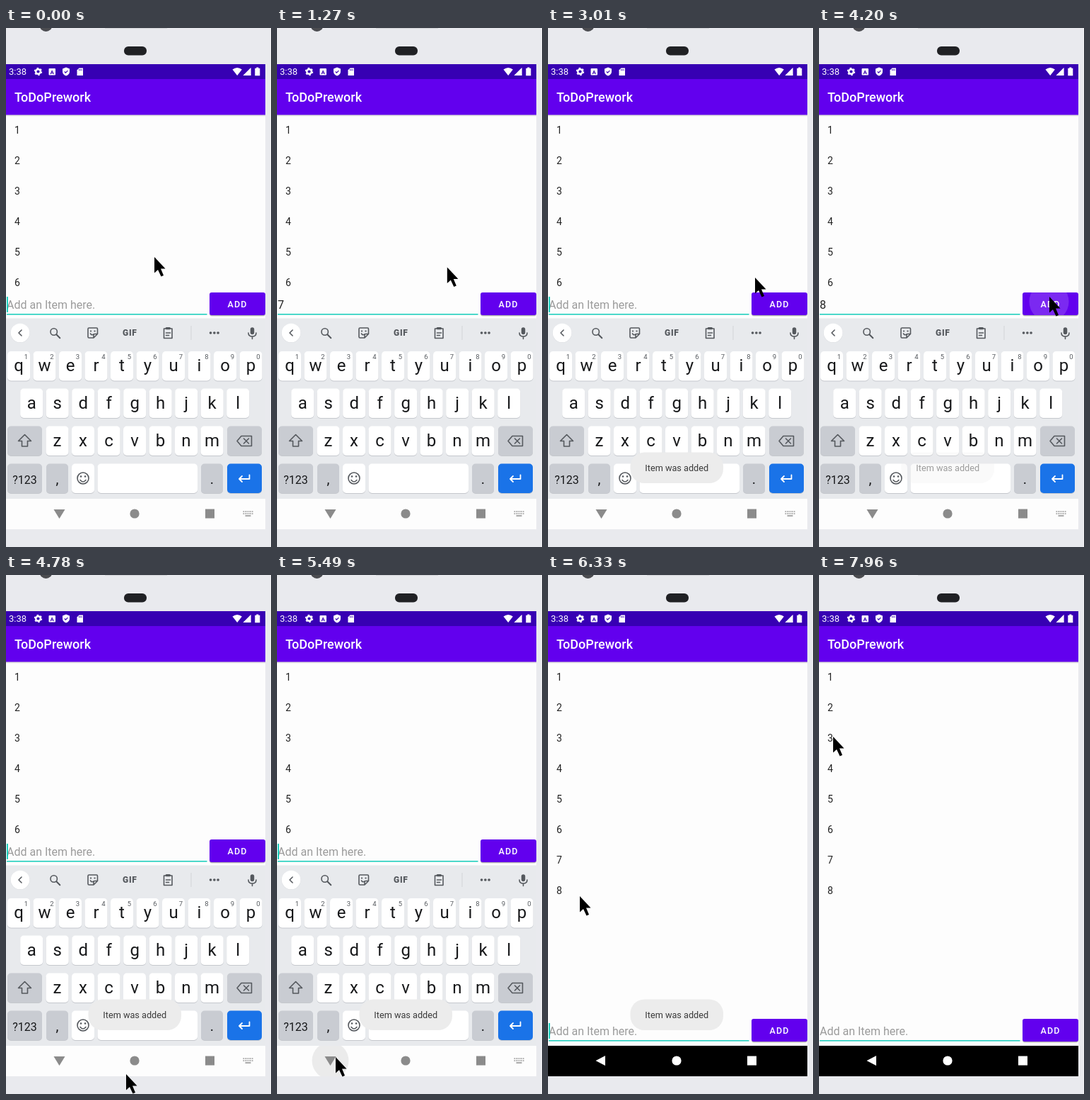
These frames come from a looping animation (375 by 732 pixels, 8000 ms). An HTML page:

```html
<!DOCTYPE html>
<html lang="en">
<head>
<meta charset="utf-8">
<title>To-do list</title>
<style>
html, body { margin: 0; width: 100%; height: 100%; overflow: hidden; background: #e9eaee; }
svg { display: block; width: 375px; height: 732px; font-family: Roboto, sans-serif; }
.line { fill: none; stroke: #55595e; stroke-width: 1.6; stroke-linecap: round; stroke-linejoin: round; }
.mid { text-anchor: middle; }
</style>
</head>
<body>
<svg viewBox="0 0 375 732">
  <defs>
    <clipPath id="listClip"><rect id="listBox" y="122" width="367" height="248"/></clipPath>
    <clipPath id="btnClip"><rect x="288" y="373" width="79" height="32" rx="3"/></clipPath>
    <clipPath id="kbClip"><rect y="406" width="367" height="258"/></clipPath>
    <clipPath id="navClip"><rect y="664" width="367" height="43"/></clipPath>
    <linearGradient id="shade" x2="0" y2="1">
      <stop stop-color="#000" stop-opacity=".22"/><stop offset="1" stop-color="#000" stop-opacity="0"/>
    </linearGradient>
  </defs>

  <!-- device -->
  <rect width="375" height="732" fill="#e9eaee"/>
  <rect x="374" width="1" height="732" fill="#f4f4f6"/>
  <circle cx="56.500" cy="-4" r="9" fill="#4b4c50"/>
  <rect x="140" width="88" height="1" fill="#d3d4d8"/>
  <rect x="167" y="26" width="32" height="12.500" rx="6" fill="#202124"/>
  <rect y="51" width="367" height="656" fill="#fdfdfd"/>

  <g id="list" clip-path="url(#listClip)" font-size="14" fill="#222"></g>

  <!-- bars -->
  <rect y="122" width="367" height="3" fill="url(#shade)"/>
  <rect y="51" width="367" height="21" fill="#3700b3"/>
  <rect y="72" width="367" height="50.500" fill="#6200ee"/>
  <text x="12" y="104" font-size="18" font-weight="500" fill="#fff">ToDoPrework</text>
  <g fill="#fff">
    <text x="4" y="66" font-size="13">3:38</text>
    <circle cx="45.500" cy="61.500" r="3.300" fill="none" stroke="#fff" stroke-width="2.400"/>
    <circle cx="45.500" cy="61.500" r="4.900" fill="none" stroke="#fff" stroke-width="1.600" stroke-dasharray="2.560"/>
    <rect x="60.500" y="57" width="9.500" height="9.500" rx="1"/>
    <text class="mid" x="65.250" y="64.700" font-size="8" font-weight="700" fill="#3700b3">A</text>
    <path d="M85 55.500l5 2v4q0 4-5 6-5-2-5-6v-4z"/>
    <path d="M82.800 61.500l1.600 1.600 2.900-3" fill="none" stroke="#3700b3" stroke-width="1.200"/>
    <path d="M103.500 56.500h5.500v10.500h-8.500v-7.500z"/>
    <path d="M103.500 58v2.200M105.300 58v2.200M107.100 58v2.200" stroke="#3700b3" stroke-width=".8"/>
    <path d="M320.500 58.500q6.700-5 13.400 0l-6.700 8.500z"/>
    <path d="M346.500 56v11h-11z" opacity=".5"/>
    <path d="M346.500 56v11h-11l7-7z"/>
    <path d="M354.300 55.500h3v1.300h2v10.500h-7v-10.500h2z"/>
  </g>

  <!-- entry row -->
  <g id="entry">
    <text id="field" x="1" y="396" font-size="16"></text>
    <rect x="1" y="403" width="283.500" height="1.600" fill="#22cfbf"/>
    <rect id="caret" y="379" width="1.800" height="22" fill="#03cbb8"/>
    <rect x="288" y="374" width="79" height="33" rx="4" opacity=".1"/>
    <rect x="288" y="374" width="79" height="32" rx="3" opacity=".22"/>
    <rect x="288" y="373" width="79" height="32" rx="3" fill="#6200ee"/>
    <g clip-path="url(#btnClip)"><circle id="ripple" cy="386" fill="#fff"/></g>
    <text x="313.500" y="394" font-size="12.500" font-weight="500" letter-spacing="1.100" fill="#fff">ADD</text>
  </g>

  <g clip-path="url(#kbClip)"><g id="keyboard">
    <rect y="410" width="367" height="254" fill="#e8eaed"/>
    <rect y="409" width="367" height="1" fill="#f2f3f5"/>
    <circle cx="20" cy="430.500" r="13.500" fill="#d9dbdf"/>
    <circle cx="20" cy="430" r="13.300" fill="#fff"/>
    <g class="line">
      <path d="M22 426l-4 4 4 4"/>
      <circle cx="67.700" cy="428.500" r="4.700"/><path d="M71.300 432.200l5 5" stroke-width="2"/>
      <path d="M117.500 423h10.500q1.500 0 1.500 1.500v7l-5.500 5.500h-6.500q-1.500 0-1.500-1.500v-11q0-1.500 1.500-1.500zM124 437v-4q0-1.500 1.500-1.500h4M119.500 431q2 3 4 1"/>
      <path d="M120 427.500h.1M125.500 427.500h.1" stroke-width="2.200"/>
      <path d="M223.500 424h11.500v13.500h-11.500zM226.500 430h6M226.500 433.500h4M227 424.500h4.500"/>
      <path d="M227 423.500h4.500" stroke-width="3"/>
      <path d="M289.500 430h.1M294.800 430h.1M300 430h.1" stroke-width="3.600"/>
      <path d="M348.500 425v4.500" stroke-width="5.500"/>
      <path d="M343 430q0 5 5.500 5t5.500-5M348.500 435v3.500"/>
    </g>
    <text x="165" y="434.300" font-size="12" font-weight="900" letter-spacing=".7" fill="#55595e">GIF</text>
    <rect x="261.500" y="420" width="1" height="20" fill="#d2d4d8"/>
    <g id="keys"></g>
    <g class="line" stroke-width="1.700">
      <path d="M26.500 573.500l9 9h-5v7.500h-8v-7.500h-5z"/>
      <path d="M333 575.500h14.500v14h-14.500l-6-7zM336.500 579l7 7M343.500 579l-7 7"/>
      <circle cx="109" cy="635" r="8"/>
      <path d="M105 637.500q4 5 8 0"/>
      <path d="M106 632.500h.1M112 632.500h.1" stroke-width="2.600"/>
      <path d="M344.500 630.500v5.500h-14M334 632l-4 4 4 4" style="stroke:#fff;stroke-width:1.800"/>
    </g>
  </g></g>

  <!-- navigation -->
  <rect id="navBack" y="664" width="367" height="43"/>
  <circle id="navRipple" cx="75.500" cy="685" r="26" clip-path="url(#navClip)"/>
  <g id="navIcons">
    <path id="back" d="M67.500 679h16l-8 13z"/>
    <circle cx="182" cy="685" r="6.600"/>
    <rect x="282" y="678.500" width="13" height="13"/>
  </g>
  <path id="imeIcon" d="M335.500 682h14M335.500 685h14" stroke="#8f8f8f" stroke-width="1.500" stroke-dasharray="1.500 1"/>
  <path id="imeBar" d="M338.500 688h8" stroke="#8f8f8f" stroke-width="1.500"/>

  <g id="toast">
    <rect id="toastBack" x="116.500" y="598.500" width="131.500" height="43.500" rx="20" fill="#ececec"/>
    <text x="137.300" y="625" font-size="12.700" fill="#3a3a3a">Item was added</text>
  </g>
  <path id="pointer" d="M0 0V22.500L5 18 9.500 27.500 13 26 9 16.500H15.500Z"/>
</svg>
<script>
const LOOP = 8000;
const $ = id => document.getElementById(id);
const set = (id, attrs) => { for (const k in attrs) $(id).setAttribute(k, attrs[k]); };
const clamp = v => Math.max(0, Math.min(1, v));

// Static keys and rows
const GREY = '#c9ccd2';
function key(x, y, w, label = '', fill = '#fff', size = 24) {
  const box = (dy, color) => `<rect x="${x}" y="${y + dy}" width="${w}" height="41.500" rx="5" fill="${color}"/>`;
  return box(1, '#c5c8cd') + box(0, fill) +
    `<text class="mid" x="${x + w / 2}" y="${y + 28}" font-size="${size}" fill="#17181a">${label}</text>`;
}
function row(letters, x, y) {
  return [...letters].map((c, i) => key(x + 36.5 * i, y, 32, c)).join('');
}
let keys = row('qwertyuiop', 2, 456) + row('asdfghjkl', 20.2, 508.5) + row('zxcvbnm', 56.5, 561.5);
for (let i = 0; i < 10; i++)
  keys += `<text class="mid" x="${28.5 + 36.5 * i}" y="466.500" font-size="9.500" fill="#55595e">${(i + 1) % 10}</text>`;
keys += key(2, 561.5, 49, '', GREY) + key(313, 561.5, 49, '', GREY) +
  key(2, 614.5, 49, '?123', GREY, 16) + key(57, 614.5, 31, ',', GREY, 20) + key(93, 614.5, 32) +
  key(129.5, 614.5, 141.5) + key(276, 614.5, 31, '.', GREY, 20) + key(313, 614.5, 49, '', '#1a73e8');
$('keys').innerHTML = keys;
$('list').innerHTML = [1, 2, 3, 4, 5, 6, 7, 8].map(n => `<text x="12" y="${106 + 43 * n}">${n}</text>`).join('');

const bursts = [[1120, 1660, 5], [1940, 2480, 5], [2880, 3810, 8], [3930, 4900, 8],
  [5050, 6060, 8], [6180, 7170, 8], [7290, 7960, 6]];
const ticks = [0, 310, 690];
for (const [a, b, n] of bursts)
  for (let i = 0; i < n; i++) ticks.push(Math.floor((a + (b - a) * i / (n - 1)) / 10) * 10);

// Pointer tip: time, x, y
const path = [[0, 210, 323], [1120, 210, 323], [1390, 274, 353], [1660, 313, 373], [1940, 303, 373],
  [2480, 303, 373], [2880, 301, 371], [3010, 293, 352], [3140, 268, 308], [3400, 237, 271],
  [3540, 250, 300], [3810, 311, 374], [4200, 326, 379], [4350, 326, 380], [4620, 242, 590],
  [4760, 170, 704], [4900, 128, 697], [5190, 88, 684], [5480, 83, 680], [5770, 82, 676],
  [6060, 60, 545], [6320, 45, 453], [6600, 40, 432], [7170, 26, 277], [7550, 20, 219], [7960, 20, 228]];
function pointerAt(t) {
  const i = path.findIndex(p => p[0] > t);
  if (i < 0) return path[path.length - 1].slice(1);
  const [a, x, y] = path[i - 1], [b, u, v] = path[i], k = (t - a) / (b - a);
  return [x + (u - x) * k, y + (v - y) * k];
}

const caretOn = [[0, 310], [690, 1120], [1660, 2480], [2880, 3400], [3670, 4200],
  [4340, 4900], [5330, 5900], [6320, 6880], [7330, 7900]];
const within = (t, a, b) => t >= a && t < b;
const fade = (t, s) => Math.min(clamp((t - s) / 300), clamp((s + 2275 - t) / 250));

function draw(time) {
  const t = ticks.filter(v => v <= time).pop();
  const typed = within(t, 690, 1940) ? '7' : within(t, 3660, 4340) ? '8' : '';
  const tall = t >= 5700;
  const slide = clamp((t - 5640) / 270);
  const dark = slide === 1;

  set('listBox', { height: tall ? 503 : 248 });
  set('entry', { transform: `translate(0 ${tall ? 253 : 0})` });
  $('field').textContent = typed || 'Add an Item here.';
  set('field', { fill: typed ? '#222' : '#9b9b9b' });
  set('caret', { x: typed ? 9.5 : 1, opacity: caretOn.some(([a, b]) => within(t, a, b)) ? 1 : 0 });

  const first = t < 3000, age = t - (first ? 1850 : 4150);
  set('ripple', {
    cx: first ? 312 : 325.5,
    r: Math.max(0, 5 + age * 0.46),
    opacity: age < 0 ? 0 : 0.16 * clamp((400 - age) / 150)
  });

  set('keyboard', { transform: `translate(0 ${254 * slide * slide})` });
  set('navBack', { fill: dark ? '#000' : '#fdfdfd' });
  set('navIcons', { fill: dark ? '#fff' : '#8b8b8b' });
  set('back', { d: dark ? 'M81 678v14l-13.500-7z' : 'M67.500 679h16l-8 13z' });
  for (const id of ['imeIcon', 'imeBar']) set(id, { opacity: dark ? 0 : 1 });
  set('navRipple', { opacity: 0.07 * Math.min(clamp((t - 5250) / 150), clamp((5850 - t) / 200)) });

  const alpha = Math.max(fade(t, 2050), fade(t, 4420));
  set('toast', { opacity: alpha });
  set('toastBack', { opacity: alpha });
  set('pointer', { transform: `translate(${pointerAt(t)})` });
}

const start = performance.now();
function tick() {
  draw((performance.now() - start) % LOOP);
  requestAnimationFrame(tick);
}
tick();
</script>
</body>
</html>
```
